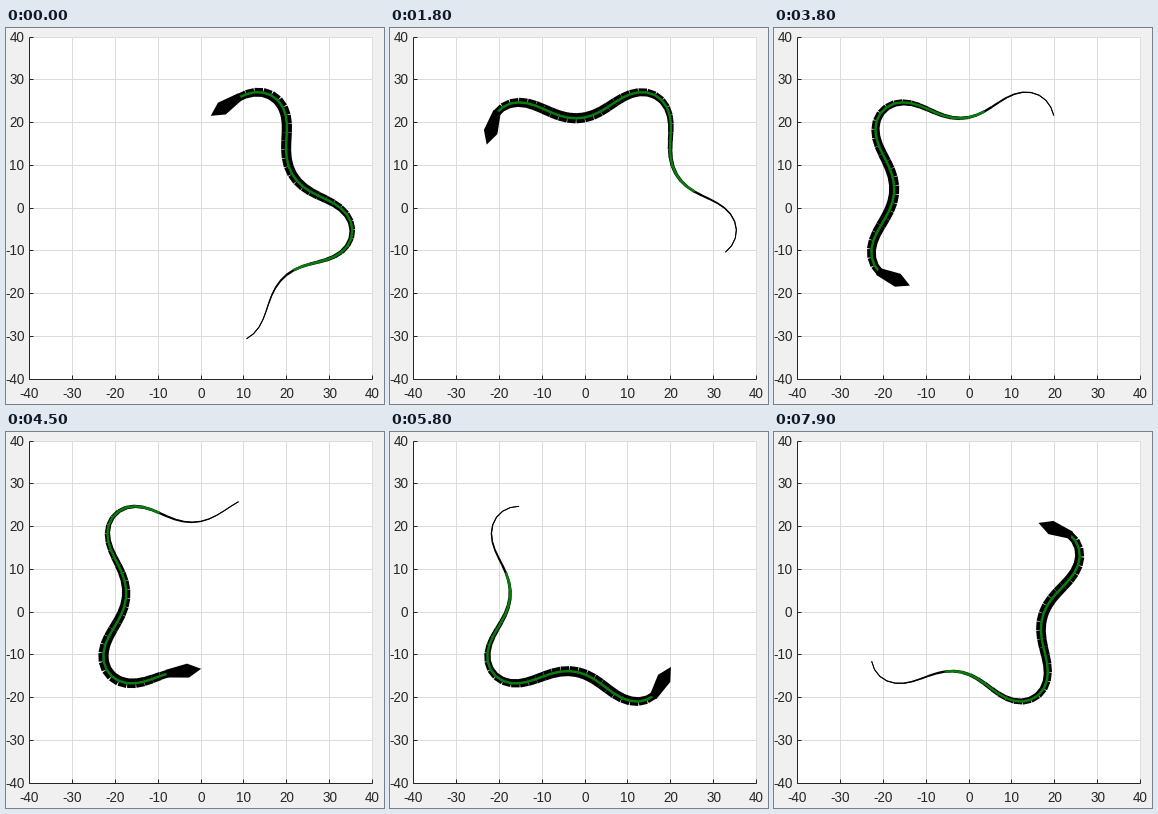
A matplotlib script for the animation above (8 s loop, 378 px wide and 376 px high).

```python
import numpy as np
import matplotlib.pyplot as plt
from matplotlib.animation import FuncAnimation
from matplotlib.collections import LineCollection
from matplotlib.patches import Polygon

W, H, DPI = 378, 376, 100
FRAMES, INTERVAL = 80, 100
LEFT, TOP, RIGHT, BOTTOM = 23, 8.7, 366, 350.7
INK, GRID, GREEN = "#262626", "#dcdcdc", "#087c0c"

WAVE = 40              # length of one wiggle, in axis units
STEP = 1 / 20          # wiggles travelled per frame, also one body segment
SEGMENTS = 43
TURN, SWING = 83.4, 48  # degrees: steady turn per wiggle, sway to each side
CENTRE, RADIUS = np.array([0, 3.4]), 27.9


def px(width):
    return width * 72 / DPI


def unit(deg):
    return np.stack([np.cos(np.radians(deg)), np.sin(np.radians(deg))], axis=-1)


def heading(q):
    """Direction of travel after q wiggles; the first loop is wider."""
    wide = 12.5 * (1 - np.tanh(5 * (q + 0.25)))
    return 143 + TURN * q + SWING * np.sin(2 * np.pi * q) + wide


def to_stage(p):
    return (np.array([195.3, 180])
            + p * [(RIGHT - LEFT) / 80, (TOP - BOTTOM) / 80])


# Walk along the heading, then pin the crest at q = 2 to its place on the ring
dq = 0.001
q_path = np.arange(-2.2, 4.5, dq)
path = np.cumsum(WAVE * dq * unit(heading(q_path - dq / 2)), axis=0)
crest = CENTRE + RADIUS * unit(heading(2) - 90)
path += crest - path[np.argmin(np.abs(q_path - 2))]


def at(q):
    return np.stack([np.interp(q, q_path, axis) for axis in path.T], axis=-1)


fig = plt.figure(figsize=(W / DPI, H / DPI), dpi=DPI, facecolor="#f0f0f0")
ax = fig.add_axes([0, 0, 1, 1])
ax.set(xlim=(0, W), ylim=(H, 0))
ax.axis("off")


def rule(x, y, color, z):
    ax.plot(x, y, color=color, lw=px(1), zorder=z, solid_capstyle="butt")


def label(x, y, text, ha):
    ax.text(x, y, text, ha=ha, va="baseline", color=INK,
            family="Liberation Sans", size=px(13.5))


ax.add_patch(plt.Rectangle((LEFT, TOP), RIGHT - LEFT, BOTTOM - TOP,
                           fc="white", ec="none", zorder=0))
for i, value in enumerate(range(-40, 41, 10)):
    x = LEFT + i * (RIGHT - LEFT) / 8
    y = BOTTOM - i * (BOTTOM - TOP) / 8
    rule([x, x], [TOP, BOTTOM], GRID, 1)
    rule([LEFT, RIGHT], [y, y], GRID, 1)
    rule([x, x], [BOTTOM, BOTTOM - 3.5], INK, 2)
    rule([LEFT, LEFT + 3.5], [y, y], INK, 2)
    label(x + 0.5, 370, str(value), "center")
    label(18.4, y + 5, str(value), "right")
rule([LEFT, LEFT], [TOP, BOTTOM], INK, 2)
rule([LEFT, RIGHT], [BOTTOM, BOTTOM], INK, 2)

# Joints run from tail to neck; u is the share of the body behind each segment
lag = np.arange(SEGMENTS, -1, -1) * STEP
u = (np.arange(SEGMENTS) + 0.5) / SEGMENTS
widths = 0.9 + 9.3 * np.sin(0.75 * np.pi * u ** 1.8)
striped = slice(SEGMENTS // 4, None)

# Head outline: distance ahead of the neck, sideways offset
HEAD = np.array([(-0.5, 0.9), (4.6, 1.65), (7.7, 0), (4.6, -1.65), (-0.5, -0.9)])

spine, = ax.plot([], [], color="black", lw=px(0.9), zorder=3)
body = LineCollection([], colors="black", linewidths=px(widths),
                      capstyle="butt", zorder=4)
ax.add_collection(body, autolim=False)
stripe, = ax.plot([], [], color=GREEN, lw=px(2.5), zorder=5,
                  solid_capstyle="butt")
head = Polygon(HEAD, closed=True, fc="black", ec="none", zorder=6)
ax.add_patch(head)


def draw(frame):
    slow_start = 2 * max(0, 1 - frame / 10)
    q = 0.12 + STEP * (frame + slow_start)

    joints = to_stage(at(q - lag))
    spine.set_data(*joints.T)
    body.set_segments(np.stack([joints[:-1], joints[1:]], axis=1))
    stripe.set_data(*joints[striped].T)

    ahead = unit(heading(q + STEP))
    side = np.array([-ahead[1], ahead[0]])
    head.set_xy(to_stage(at(q) + HEAD[:, :1] * ahead + HEAD[:, 1:] * side))
    return spine, body, stripe, head


anim = FuncAnimation(fig, draw, frames=FRAMES, interval=INTERVAL,
                     repeat=True, repeat_delay=0, blit=False)
plt.show()
```
